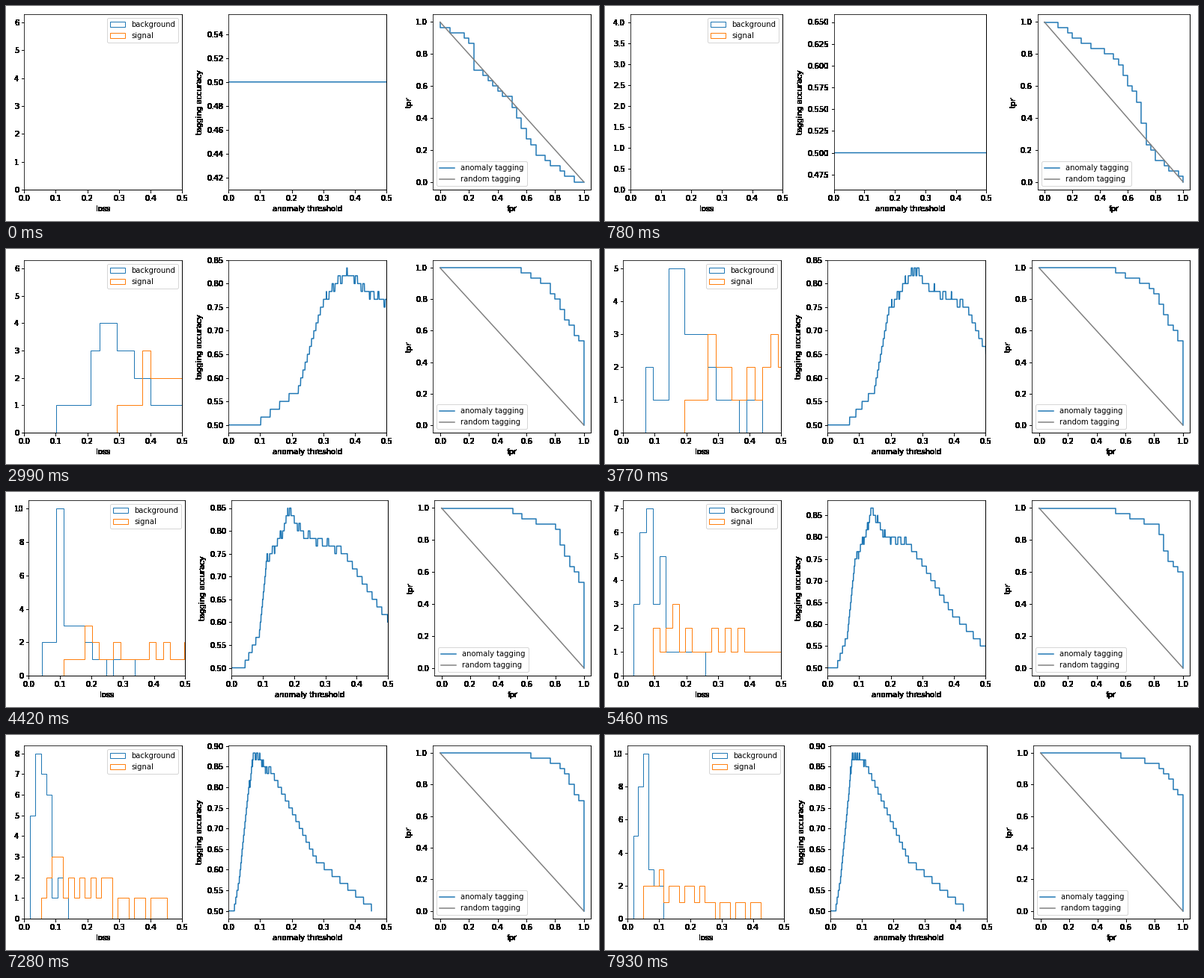
Recreate the animation shown at these times as a matplotlib script. Size 792x288 px, loop 8 s.

```python
import numpy as np
import matplotlib.pyplot as plt
from matplotlib.animation import FuncAnimation

N = 30        # samples per class
BINS = 25
STEPS = 62
LOOP_MS = 8000

# Key points of the sorted losses: epoch -> (background, signal),
# each given at the ranks below; all other ranks and epochs are blended.
BG_RANKS = [0, 4, 14, 20, 24, 29]
SG_RANKS = [0, 3, 8, 15, 22, 29]
KEYS = {
    0: ([.715, .82, 1.125, 1.375, 1.48, 1.585],
        [.7, .88, .91, 1.165, 1.3, 1.555]),
    6: ([.55, .63, .8, 1.05, 1.22, 1.34],
        [.604, .686, .89, 1.06, 1.12, 1.35]),
    15: ([.232, .41, .493, .521, .638, .74],
         [.314, .385, .498, .537, .67, .77]),
    23: ([.102, .221, .291, .346, .401, .52],
         [.31, .376, .43, .5385, .572, .782]),
    34: ([.043, .089, .113, .163, .185, .335],
         [.115, .18, .23, .37, .48, .6105]),
    50: ([.021, .0375, .06, .081, .089, .1525],
         [.08, .109, .1345, .228, .312, .486]),
    61: ([.017, .0315, .053, .0625, .0689, .107],
         [.0565, .08, .112, .181, .249, .4245]),
}


def losses(epoch):
    """Sorted background and signal losses at an epoch."""
    pair = []
    for ranks, rows in zip((BG_RANKS, SG_RANKS), zip(*KEYS.values())):
        points = [np.interp(epoch, list(KEYS), track) for track in zip(*rows)]
        pair.append(np.interp(np.arange(N), ranks, points))
    return pair


def harden(img, dpi):
    """Make every touched pixel opaque, as on a flattened transparent canvas."""
    img = np.rint(img * 255).astype(np.uint8)
    img[..., 3] = np.where(img[..., 3] > 0, 255, 0)
    return img, 0, 0


plt.rcParams.update({"font.family": "DejaVu Sans", "font.size": 10})
fig, (ax_hist, ax_acc, ax_roc) = plt.subplots(
    1, 3, figsize=(11, 4), dpi=72, facecolor="white")
for ax in (ax_hist, ax_acc, ax_roc):
    ax.set_agg_filter(harden)

polys = [ax_hist.hist([0.1], histtype="step", color=color, label=label)[2][0]
         for color, label in (("C0", "background"), ("C1", "signal"))]
ax_hist.set(xlim=(0, 0.5), xlabel="loss")
ax_hist.legend(loc="upper right")

acc_line, = ax_acc.plot([], [], color="C0")
ax_acc.set(xlim=(0, 0.5), xlabel="anomaly threshold",
           ylabel="tagging accuracy")

roc_line, = ax_roc.plot([], [], color="C0", label="anomaly tagging")
ax_roc.plot([0, 1], [1, 0], color="gray", label="random tagging")
ax_roc.set(xlim=(-0.05, 1.05), ylim=(-0.05, 1.05), xlabel="fpr", ylabel="tpr")
ax_roc.legend(loc="lower left")


def draw_hist(bg, sg):
    both = np.concatenate([bg, sg])
    edges = np.linspace(both.min(), both.max(), BINS + 1)
    top = 0
    for poly, loss in zip(polys, (bg, sg)):
        counts, _ = np.histogram(loss, edges)
        heights = np.concatenate([[0], np.repeat(counts, 2), [0]])
        poly.set_xy(np.column_stack([np.repeat(edges, 2), heights]))
        top = max(top, counts.max())
    ax_hist.set_ylim(0, 1.05 * top)


def draw_accuracy(bg, sg):
    cuts = np.linspace(0, max(bg[-1], sg[-1]), 1000)
    below_bg, below_sg = (np.searchsorted(loss, cuts, side="right")
                          for loss in (bg, sg))
    acc = (N + below_bg - below_sg) / (2 * N)
    acc_line.set_data(cuts, acc)
    pad = 0.05 * np.ptp(acc)
    ax_acc.set_ylim(acc.min() - pad, acc.max() + pad)


def draw_roc(bg, sg):
    is_bg = np.argsort(np.concatenate([bg, sg]), kind="stable") < N
    x = np.cumsum(is_bg) / N
    y = 1 - np.cumsum(~is_bg) / N
    roc_line.set_data(np.r_[0, x], np.r_[1, y])


def update(step):
    bg, sg = losses(step)
    draw_hist(bg, sg)
    draw_accuracy(bg, sg)
    draw_roc(bg, sg)
    # start every layout from the same margins
    fig.subplots_adjust(left=0.125, right=0.9, bottom=0.125, top=0.88,
                        wspace=0.2)
    fig.tight_layout()
    return []


anim = FuncAnimation(fig, update, frames=STEPS, interval=LOOP_MS / STEPS,
                     init_func=lambda: [], repeat=True, repeat_delay=0)
plt.show()
```
